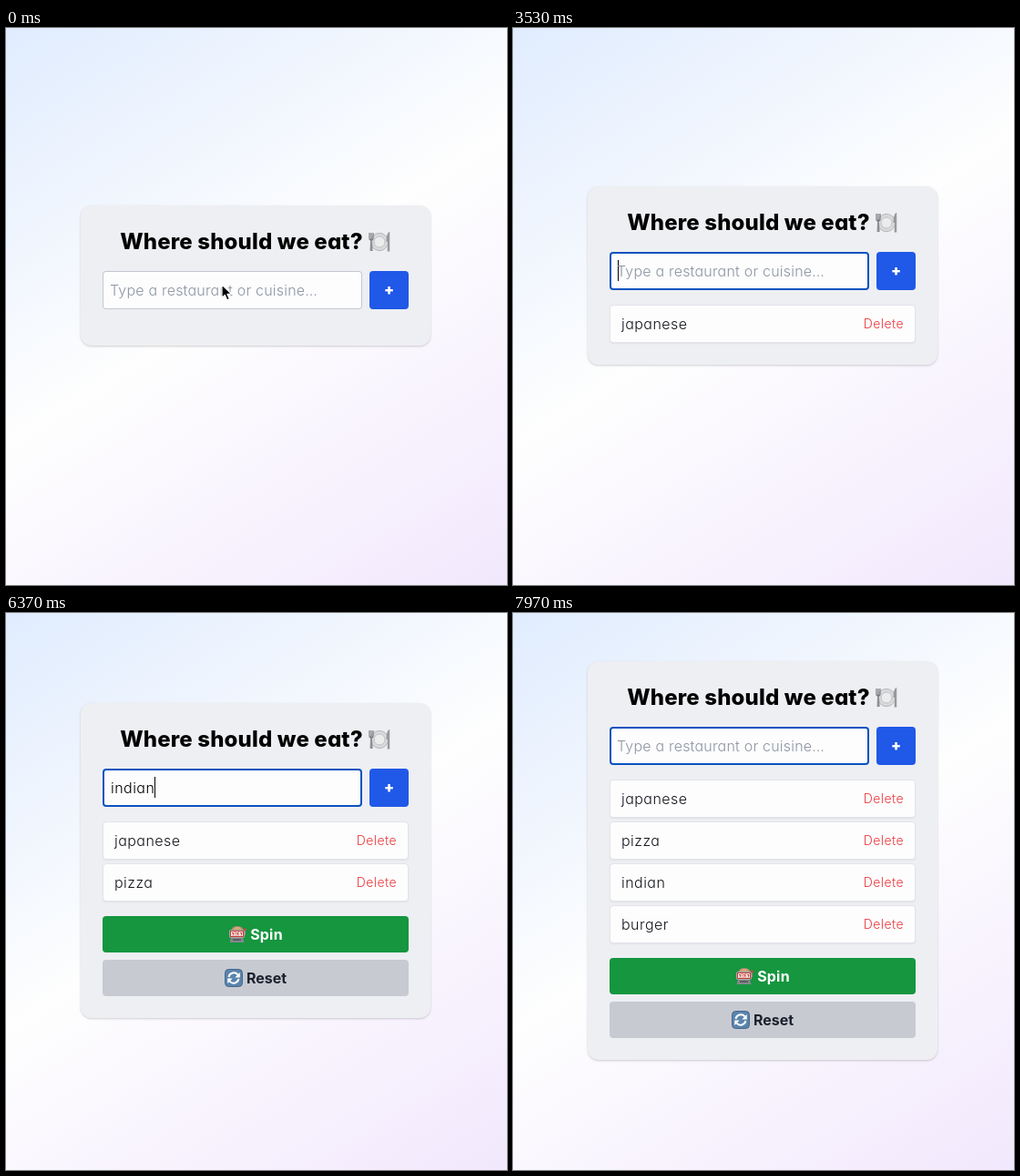
Animation, 550 px wide and 612 px high, one loop 8 s. Source, as an HTML page:

```html
<!DOCTYPE html>
<html lang="en">
<head>
<meta charset="utf-8">
<title>Where should we eat?</title>
<style>
* { box-sizing: border-box; }
html, body { margin: 0; width: 100%; height: 100%; overflow: hidden; }
body {
  position: relative;
  background: linear-gradient(148deg, #e0ecfe, #fefefe 48%, #f2e8fd);
  font: 300 16px/24px Inter, "Open Sans", sans-serif;
  font-feature-settings: "cv11" 1;
  color: #15171c;
}
.card {
  position: absolute; left: 82px; top: 272px; width: 384px; padding: 24px;
  transform: translateY(-50%);
  border-radius: 12px; background: #eeeff3;
  box-shadow: 0 1px 3px rgba(0, 0, 0, .12), 0 1px 2px rgba(0, 0, 0, .07);
}
h1 {
  display: flex; justify-content: center; align-items: center; gap: 5px;
  margin: 0 0 16px; height: 32px; color: #000;
  font-size: 24px; font-weight: 800; letter-spacing: .15px; white-space: nowrap;
}
svg { display: block; flex: none; }
.row { display: flex; gap: 8px; }
.field {
  position: relative; width: 285px; height: 42px; padding: 9px;
  border-radius: 4px; background: #fdfdfe;
  box-shadow: inset 0 0 0 1px #c2c8d0; white-space: nowrap;
}
.field.focus { box-shadow: inset 0 0 0 2px #0a53bf; }
.hint { position: absolute; left: 8px; top: 9px; color: #8d95a2; letter-spacing: .2px; }
.typed, .item span { letter-spacing: .45px; }
.typed { color: #000; }
.caret {
  display: inline-block; width: 1px; height: 23px;
  vertical-align: top; background: #000;
}
.add {
  width: 43px; height: 42px; border-radius: 4px; background: #2058e7;
  color: #fff; font-weight: 900; line-height: 41px; text-align: center;
}
.list { display: flex; flex-direction: column; gap: 4px; margin-top: 16px; }
.item {
  display: flex; justify-content: space-between; align-items: center;
  height: 42px; padding: 0 12px; border: 1px solid #e2e4e9; border-radius: 4px;
  background: #fdfdfe; box-shadow: 0 1px 2px rgba(0, 0, 0, .06);
}
.item b { font-size: 14px; font-weight: 300; letter-spacing: .4px; color: #ec393d; }
.btn {
  display: flex; justify-content: center; align-items: center; gap: 4px;
  height: 40px; border-radius: 4px; font-weight: 700;
}
.spin { margin-top: 16px; background: #15963f; color: #fff; letter-spacing: .2px; }
.reset { margin-top: 8px; background: #c8cad2; color: #1b212d; }
.mouse { position: absolute; left: 0; top: 0; overflow: visible; }
[hidden] { display: none !important; }
</style>
</head>
<body>
<div class="card">
  <h1>Where should we eat?
    <svg width="26" height="24" viewBox="0 0 26 24">
      <circle cx="13" cy="12" r="9.6" fill="#d9dadc" stroke="#b4b6b9"/>
      <circle cx="13" cy="12" r="6" fill="#ececed" stroke="#bcbec1" stroke-width=".9"/>
      <path d="M2 2v6q0 2 2 2t2-2V2M4 2v20" fill="none" stroke="#77797d" stroke-width="1.2"/>
      <path d="M3 12h2l.6 10H2.6z" fill="#8d8f93"/>
      <path d="M23.5 1q-3 2-3 11h1.6l-.5 10.5h2.6V1z" fill="#97999d"/>
    </svg>
  </h1>
  <div class="row">
    <div class="field">
      <span class="hint">Type a restaurant or cuisine…</span><span class="typed"></span><span class="caret"></span>
    </div>
    <div class="add">+</div>
  </div>
  <div class="list"></div>
  <div class="actions">
    <div class="btn spin">
      <svg width="20" height="20" viewBox="0 0 20 20">
        <path d="M3 6Q4 1 10 1t7 5z" fill="#a88478"/>
        <path d="M5 4.5Q6 2 10 2t5 2.500z" fill="#d8b070"/>
        <rect x="1" y="5" width="17" height="9" rx="2" fill="#a8aaad"/>
        <rect x="2" y="6" width="15" height="7" fill="#c63a34"/>
        <path d="M3 7h4v5H3zm4.500 0h4v5h-4zm4.500 0h4v5h-4z" fill="#f6eee8"/>
        <path d="M4 8.500h2l-1 3m3.500-3h2l-1 3m3.500-3h2l-1 3" fill="none" stroke="#c63a34"/>
        <path d="M3 14h13l1.500 5h-16z" fill="#85888c"/>
        <path d="M5 16h9" stroke="#4e5155" stroke-width="1.5"/>
        <path d="M18.5 11V6" stroke="#8a8c90" stroke-width="1.2"/>
        <circle cx="18.5" cy="5" r="1.4" fill="#d2453e"/>
      </svg>Spin
    </div>
    <div class="btn reset">
      <svg width="20" height="20" viewBox="0 0 20 20">
        <rect x=".5" y=".5" width="19" height="19" rx="4" fill="#5a84ac" stroke="#44698e"/>
        <g fill="none" stroke="#fff" stroke-width="2">
          <path d="M4.500 9A5.800 5.800 0 0 1 14.500 6.300"/>
          <path d="M15.500 11A5.800 5.800 0 0 1 5.500 13.700"/>
        </g>
        <path d="M16.800 4v5.500h-5.500zM3.200 16v-5.500h5.500z" fill="#fff"/>
      </svg>Reset
    </div>
  </div>
</div>
<svg class="mouse" width="1" height="1">
  <defs>
    <path id="bar" d="M-3.500-7.500Q0-7.500 0-5Q0-7.500 3.500-7.500M0-5.500V5.500M-3.500 7.500Q0 7.500 0 5Q0 7.500 3.500 7.500M-2 2H2"/>
  </defs>
  <path id="arrow" d="M0 0v14.500l3.300-3.100 2.400 5.500 2.700-1.200-2.400-5.300h4.600z"
    fill="#000" stroke="#fff" stroke-width="1.2" stroke-linejoin="round"/>
  <g id="beam" fill="none">
    <use href="#bar" stroke="#fff" stroke-width="2.4"/>
    <use href="#bar" stroke="#111" stroke-width="1.2"/>
  </g>
</svg>
<script>
const LOOP = 8000, FOCUS = 870, BLINK = 500, BEAM_AT = 130;

// word, key press times, time it is added to the list
const words = [
  ["japanese", [2270, 2370, 2500, 2600, 2700, 3100, 3230, 3370], 3530],
  ["pizza", [3830, 3970, 4100, 4270, 4400], 4570],
  ["indian", [5270, 5400, 5530, 5670, 5800, 5930], 6500],
  ["burger", [6700, 6830, 6930, 7070, 7170, 7270], 7770]
];

// mouse path: time, x, y
const from = [30, 237, 282], to = [830, 221, 283];

const $ = s => document.querySelector(s);
const field = $(".field"), hint = $(".hint"), typed = $(".typed"), caret = $(".caret");
const actions = $(".actions"), mouse = $(".mouse"), arrow = $("#arrow"), beam = $("#beam");

const items = words.map(([word]) => {
  const el = document.createElement("div");
  el.className = "item";
  el.innerHTML = `<span>${word}</span><b>Delete</b>`;
  $(".list").append(el);
  return el;
});

const show = (el, on) => el.toggleAttribute("hidden", !on);
const ease = p => p * p * (3 - 2 * p);

function drawMouse(t) {
  const p = ease(Math.min(1, Math.max(0, (t - from[0]) / (to[0] - from[0]))));
  const [x, y] = [1, 2].map(i => from[i] + (to[i] - from[i]) * p);
  mouse.style.transform = `translate(${x}px, ${y}px)`;
  show(mouse, t < words[0][1][0]);
  show(arrow, t < BEAM_AT);
  show(beam, t >= BEAM_AT);
}

function draw(t) {
  let text = "", lastKey = FOCUS, added = 0;
  words.forEach(([word, keys, done], i) => {
    const pressed = keys.filter(k => k <= t);
    if (pressed.length) lastKey = pressed[pressed.length - 1];
    if (t < done) text += word.slice(0, pressed.length);
    else added++;
    show(items[i], t >= done);
  });

  const focused = t >= FOCUS;
  field.classList.toggle("focus", focused);
  if (typed.textContent !== text) typed.textContent = text;
  show(hint, !text);
  show(caret, focused && Math.floor((t - lastKey) / BLINK) % 2 === 0);
  show(actions, added > 1);
  drawMouse(t);
}

const start = performance.now();
function tick() {
  draw((performance.now() - start) % LOOP);
  requestAnimationFrame(tick);
}
draw(0);
requestAnimationFrame(tick);
</script>
</body>
</html>
```
